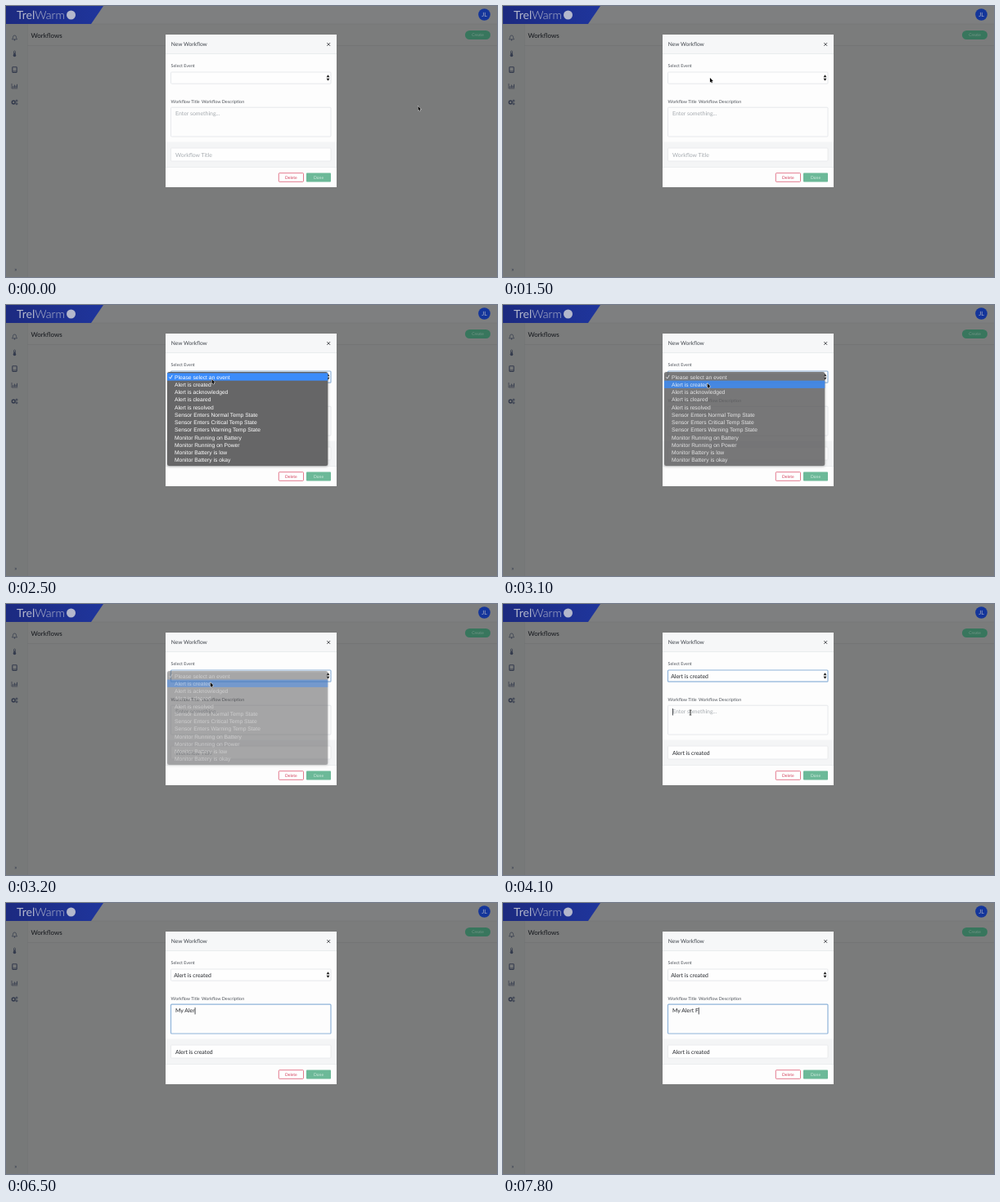
An HTML page with a canvas that plays this animation: 600 by 332 pixels, repeating every 8 s.

```html
<!DOCTYPE html>
<html lang="en">
<head>
<meta charset="utf-8">
<title>New workflow</title>
<style>
html, body { margin: 0; width: 100%; height: 100%; overflow: hidden; background: #7a7b7b; }
canvas { display: block; width: 600px; height: 332px; }
</style>
</head>
<body>
<canvas id="stage"></canvas>
<script>
const W = 600, H = 332, LOOP = 8000, STEP = 100;
const LATO = 'Lato, sans-serif', MENU_FONT = '"Liberation Sans", Arial, sans-serif';
const MENU_OPEN = 1800, MENU_PICK = 3000, MENU_GONE = 3300, FIELD_CLICK = 4100;
const FIELD_SIZE = 6.9, ROW = 9.25, ROW_TOP = 83.4;
const FOCUS = [143, 180, 218], IDLE = [225, 228, 231];
const INK = '#343b4d';

const EVENTS = ['Please select an event', 'Alert is created', 'Alert is acknowledged',
  'Alert is cleared', 'Alert is resolved', 'Sensor Enters Normal Temp State',
  'Sensor Enters Critical Temp State', 'Sensor Enters Warning Temp State',
  'Monitor Running on Battery', 'Monitor Running on Power',
  'Monitor Battery is low', 'Monitor Battery is okay'];

const KEYS = [[5400, 'M'], [5800, 'y'], [6100, ' A'], [6300, 'l'], [6400, 'e'],
  [6500, 'r'], [6700, 't'], [6800, ' '], [7800, 'F']];

// time, x, y of the pointer tip
const PATH = [[200, 503.5, 122.5], [1400, 253, 88], [2500, 251.5, 91],
  [3000, 249.8, 96], [3400, 249.8, 96], [4000, 229, 133]];

const canvas = document.getElementById('stage');
const ctx = canvas.getContext('2d');
const ratio = window.devicePixelRatio || 1;
canvas.width = W * ratio;
canvas.height = H * ratio;
ctx.scale(ratio, ratio);
ctx.textRendering = 'geometricPrecision';

const clamp = v => Math.min(1, Math.max(0, v));
const smooth = v => v * v * (3 - 2 * v);
const mix = (a, b, k) => `rgb(${a.map((v, i) => Math.round(v + (b[i] - v) * k))})`;

function rect(x, y, w, h, fill) {
  ctx.fillStyle = fill;
  ctx.fillRect(x, y, w, h);
}

function box(x, y, w, h, r, fill, stroke, width = 0.8) {
  ctx.beginPath();
  ctx.roundRect(x, y, w, h, r);
  if (fill) { ctx.fillStyle = fill; ctx.fill(); }
  if (stroke) { ctx.strokeStyle = stroke; ctx.lineWidth = width; ctx.stroke(); }
}

function disc(x, y, r, fill) {
  ctx.beginPath();
  ctx.arc(x, y, r, 0, Math.PI * 2);
  ctx.fillStyle = fill;
  ctx.fill();
}

function ring(x, y, r, color, width) {
  ctx.beginPath();
  ctx.arc(x, y, r, 0, Math.PI * 2);
  ctx.strokeStyle = color;
  ctx.lineWidth = width;
  ctx.stroke();
}

function poly(points, fill) {
  ctx.beginPath();
  points.forEach(([x, y]) => ctx.lineTo(x, y));
  ctx.closePath();
  ctx.fillStyle = fill;
  ctx.fill();
}

function line(points, color, width) {
  ctx.beginPath();
  points.forEach(([x, y]) => ctx.lineTo(x, y));
  ctx.strokeStyle = color;
  ctx.lineWidth = width;
  ctx.stroke();
}

// y is the middle of the capitals; returns the advance width
function text(str, x, y, size, color, { font = LATO, weight = 400, align = 'left' } = {}) {
  ctx.font = `${weight} ${size}px ${font}`;
  ctx.textAlign = align;
  ctx.fillStyle = color;
  ctx.fillText(str, x, y + size * 0.36);
  return ctx.measureText(str).width;
}

function drawIcons() {
  // bell
  ctx.beginPath();
  ctx.moveTo(7.4, 40.8);
  ctx.quadraticCurveTo(8.5, 40, 8.5, 38);
  ctx.quadraticCurveTo(8.6, 36, 10.5, 36);
  ctx.quadraticCurveTo(12.4, 36, 12.5, 38);
  ctx.quadraticCurveTo(12.5, 40, 13.6, 40.8);
  ctx.closePath();
  ctx.strokeStyle = INK;
  ctx.lineWidth = 0.7;
  ctx.stroke();
  disc(10.5, 41.8, 0.8, INK);
  // thermometer
  box(9.5, 55, 2, 5, 1, null, INK, 0.7);
  disc(10.5, 60.5, 1.8, INK);
  line([[10.5, 57], [10.5, 60]], INK, 0.8);
  // monitor
  box(7.8, 74.8, 5.4, 6.6, 0.6, null, INK, 1.1);
  line([[8, 79.8], [13, 79.8]], INK, 0.7);
  // chart
  line([[7, 95], [7, 101], [14.2, 101]], INK, 0.7);
  [[8.3, 2], [9.9, 3.6], [11.5, 2.6], [13, 4.4]].forEach(([x, h]) => rect(x, 100.2 - h, 0.9, h, INK));
  // gears
  ring(9.2, 118, 1.9, INK, 1.5);
  ring(13, 116.1, 1, INK, 0.9);
  ring(13, 119.9, 1, INK, 0.9);
  text('»', 11.7, 322.4, 7, INK, { align: 'center' });
}

function drawPage() {
  rect(0, 0, W, H, '#7a7b7b');
  rect(0, 0, W, 22, '#7e7f80');
  rect(0, 22, 26, H - 22, '#777979');
  rect(26, 22, W - 26, 26, '#7b7c7c');
  rect(0, 21.7, W, 0.6, '#737576');
  rect(26, 48, W - 26, 0.7, '#707273');
  rect(26, 22, 0.6, H - 22, '#727475');

  const blue = ctx.createLinearGradient(0, 0, 118, 0);
  blue.addColorStop(0, '#1c2a80');
  blue.addColorStop(1, '#1f359c');
  poly([[0, 0], [119, 0], [104, 22], [0, 22]], blue);
  const first = text('Trel', 13, 11, 14, '#b4b8cc');
  text('Warm', 13 + first, 11, 14, '#b4b8cc', { weight: 300 });
  disc(79.5, 11, 5.5, '#b4b8cc');

  disc(584.5, 10.5, 7.3, '#14359a');
  text('JL', 584.5, 10.6, 7.2, '#a5acc6', { align: 'center' });
  text('Workflows', 30.5, 35.7, 8, '#14171c');
  box(561, 30, 31, 11, 5.5, '#38765d');
  text('Create', 576.5, 35.5, 5, '#76988a', { align: 'center' });
  drawIcons();
}

function drawModal(t) {
  const picked = t >= MENU_GONE;
  const moved = smooth(clamp((t - FIELD_CLICK) / 200));
  const selectFocus = t >= MENU_OPEN ? 1 - moved : 0;

  rect(195, 35, 209, 187, '#fdfdfd');
  rect(195, 35, 209, 23.3, '#f6f7f8');
  rect(195, 58, 209, 0.7, '#e3e5e7');
  text('New Workflow', 201.8, 46.8, 6.65, '#3f444b');
  line([[392.3, 45.1], [396.1, 48.9]], '#3a3d42', 0.9);
  line([[396.1, 45.1], [392.3, 48.9]], '#3a3d42', 0.9);

  text('Select Event', 201.6, 73, 5.4, '#50555c');
  box(201.5, 81, 195.5, 14.2, 1, '#fefefe', mix(IDLE, FOCUS, selectFocus), 0.8 + 0.4 * selectFocus);
  poly([[391.6, 87.2], [393.5, 84.3], [395.4, 87.2]], '#1c1c1c');
  poly([[391.6, 88.8], [393.5, 91.7], [395.4, 88.8]], '#1c1c1c');
  if (picked) text(EVENTS[1], 205.2, 88.3, FIELD_SIZE, '#202328');

  text('Workflow Title', 201.6, 116.6, 5.4, '#50555c');
  text('Workflow Description', 239, 116.6, 5.4, '#50555c');
  box(201.5, 124.2, 195.5, 35.8, 1, '#fdfdfd', mix(IDLE, FOCUS, moved), 0.8 + 0.4 * moved);
  drawTyping(t);

  rect(195, 166.5, 209, 30.5, '#f4f5f6');
  box(201.5, 174, 195.5, 16, 1, '#fefefe', '#e6e8ea');
  if (picked) text(EVENTS[1], 207, 182.4, FIELD_SIZE, '#202328');
  else text('Workflow Title', 207, 182.4, FIELD_SIZE, '#a6abb0');

  rect(195, 197, 209, 0.7, '#e6e8ea');
  box(333.3, 204.7, 30.2, 10.6, 0.8, '#fefefe', '#dd5a72');
  text('Delete', 348.3, 210, 5, '#d2405c', { align: 'center' });
  box(367, 204.4, 30, 11.2, 0.8, '#6cb998');
  text('Done', 382, 210, 5, '#d3ebe0', { align: 'center' });
}

function drawTyping(t) {
  const pressed = KEYS.filter(([time]) => t >= time);
  const typed = pressed.map(([, key]) => key).join('');
  let caretX = 207;
  if (typed) caretX += text(typed, 207, 132, FIELD_SIZE, '#202328');
  else text('Enter something...', 207, 132, FIELD_SIZE, '#a6abb0');

  const last = pressed.length ? pressed[pressed.length - 1][0] : FIELD_CLICK;
  const lit = t >= FIELD_CLICK && Math.floor((t - last) / 500) % 2 === 0;
  if (lit) rect(caretX, 128, 0.8, 8.4, '#22252a');
}

function drawMenu(t, pointerY) {
  if (t < MENU_OPEN || t >= MENU_GONE) return;
  const fade = clamp((t - MENU_PICK) / (MENU_GONE - MENU_PICK));
  ctx.save();
  ctx.globalAlpha = 1 - Math.pow(fade, 1.5);
  ctx.shadowColor = 'rgba(0,0,0,0.3)';
  ctx.shadowBlur = 3 * ratio;
  ctx.shadowOffsetY = ratio;
  box(197, 82, 196.3, 115, 2.5, '#666667');
  ctx.shadowColor = 'transparent';
  const active = pointerY > ROW_TOP + ROW ? 1 : 0;
  rect(197, ROW_TOP + active * ROW, 196.3, ROW, '#3b8cfb');
  EVENTS.forEach((name, i) =>
    text(name, 206, 88.1 + i * ROW, 6.72, '#fff', { font: MENU_FONT }));
  line([[199.4, 88.3], [200.8, 90.2], [203.2, 85.9]], '#fff', 0.9);
  ctx.restore();
}

function pointerAt(t) {
  const next = PATH.findIndex(([time]) => time > t);
  if (next === 0) return PATH[0].slice(1);
  if (next < 0) return PATH[PATH.length - 1].slice(1);
  const [t0, x0, y0] = PATH[next - 1], [t1, x1, y1] = PATH[next];
  const k = smooth((t - t0) / (t1 - t0));
  return [x0 + (x1 - x0) * k, y0 + (y1 - y0) * k];
}

function drawPointer(t, x, y) {
  if (t >= KEYS[0][0]) return;
  if (t > MENU_GONE && y > 124) {
    line([[x, y - 3], [x, y + 3]], '#222', 0.9);
    [-3, 3].forEach(d => line([[x - 1.3, y + d], [x + 1.3, y + d]], '#222', 0.7));
    return;
  }
  const arrow = [[0, 0], [0, 5.4], [1.2, 4.4], [2, 6.3], [2.9, 5.9], [2.1, 4.1], [3.8, 4]]
    .map(([dx, dy]) => [x + dx, y + dy]);
  line([...arrow, arrow[0]], '#e8e8e8', 1);
  poly(arrow, '#080808');
}

function draw(now) {
  const t = Math.floor((now % LOOP) / STEP) * STEP;
  const [x, y] = pointerAt(t);
  drawPage();
  drawModal(t);
  drawMenu(t, y);
  drawPointer(t, x, y);
}

const start = performance.now();
function tick() {
  draw(performance.now() - start);
  requestAnimationFrame(tick);
}
tick();
</script>
</body>
</html>
```
